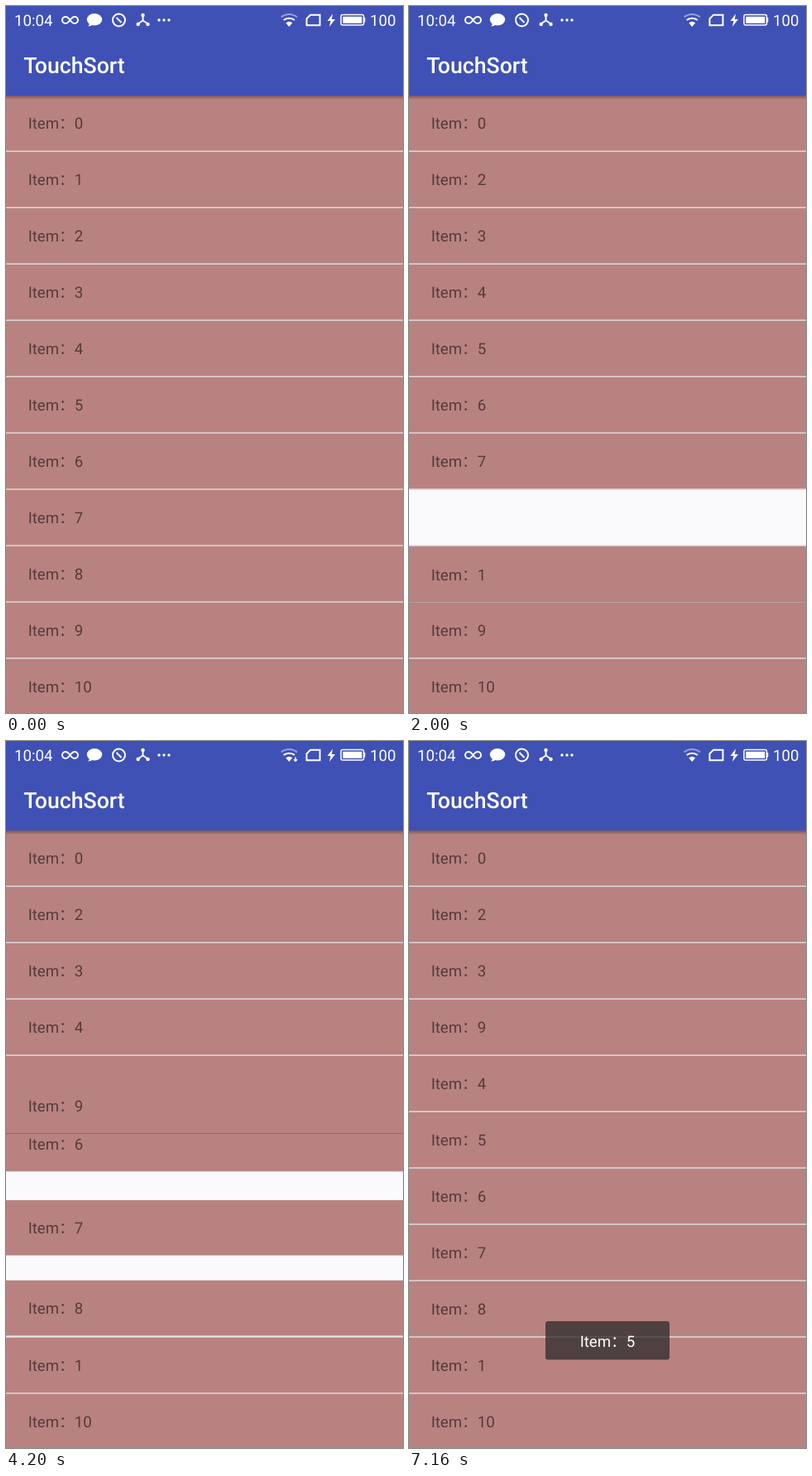
An HTML page that plays this animation: 480 by 853 pixels, repeating every 7.2 s.

```html
<!DOCTYPE html>
<html lang="zh-CN">
<head>
<meta charset="utf-8">
<title>TouchSort</title>
<style>
  html, body { margin: 0; height: 100%; overflow: hidden; background: #faf9fc; }
  svg { display: block; width: 100vw; height: 100vh; }
  text {
    font: 18.67px Roboto, "Noto Sans CJK SC", "Noto Sans CJK", sans-serif;
    text-rendering: geometricPrecision;
  }
  .row text { fill: rgba(0, 0, 0, .54); }
  .icon { fill: none; stroke: #fff; stroke-width: 2; }
  .solid, .bar text { fill: #fff; stroke: none; }
  .bar .title { font-size: 26.67px; font-weight: 500; }
  .dots { stroke-width: 3.4; stroke-linecap: round; stroke-dasharray: 0 6; }
  .nodes { stroke-width: 4.4; stroke-linecap: round; }
</style>
</head>
<body>
<svg viewBox="0 0 480 853">
  <defs>
    <linearGradient id="shade" x2="0" y2="1">
      <stop stop-opacity=".34"/>
      <stop offset="1" stop-opacity="0"/>
    </linearGradient>
  </defs>
  <g id="lines" fill="#ddd"></g>
  <g id="list"></g>
  <rect y="108" width="480" height="5" fill="url(#shade)"/>
  <g class="bar">
    <rect width="480" height="108" fill="#3f51b5"/>
    <text x="10" y="23.5">10:04</text>
    <text x="440" y="23.5">100</text>
    <text class="title" x="21.33" y="81">TouchSort</text>
    <g class="icon">
      <path d="M77.5 17q-3-4-5.500-4a4 4 0 0 0 0 8q2.500 0 5.500-4t5.500-4a4 4 0 0 1 0 8q-2.500 0-5.500-4"/>
      <ellipse class="solid" cx="107" cy="16.300" rx="9.200" ry="7.300"/>
      <path class="solid" d="M101 20q0 3-2 4.500 4 0 6-2z"/>
      <circle cx="136.500" cy="17" r="7.500"/>
      <path d="M133.500 14l6 6M165.500 11v6.500l-6 4M165.500 17.500l6 4"/>
      <path class="nodes" d="M165.500 11h0M159.700 22h0M171.500 22h0"/>
      <path class="dots" d="M185 17h12.100"/>
      <path d="M332.700 13.500a15 15 0 0 1 19.200 0" opacity=".45"/>
      <path d="M335.700 17.100a10.300 10.300 0 0 1 13.200 0"/>
      <path class="solid" d="M342.300 25l-3.900-4.600a6 6 0 0 1 7.800 0z"/>
      <path id="arrow" d="M350 19.500v4.500m-2-1.800l2 2 2-2" stroke-width="1.500"/>
      <path d="M368 10.700h11.500v12.600h-16v-8z"/>
      <path class="solid" d="M395 9.500l-6.500 8.500h4l-1.500 7 7-9h-4.200z"/>
      <rect x="405" y="10.500" width="27.500" height="12.500" rx="2" stroke-width="1.500"/>
      <rect class="solid" x="407.300" y="12.800" width="23" height="8"/>
      <rect class="solid" x="432.500" y="14" width="1.800" height="5.500"/>
    </g>
  </g>
  <g id="toast">
    <rect x="165" y="700" width="150" height="46.500" rx="3" fill="#2b2b2b" fill-opacity=".75"/>
    <text x="206.67" y="730.500" fill="#fff">Item：5</text>
  </g>
</svg>
<script>
const LOOP = 7200, STEP = 40;
const TOP = 107.96, PITCH = 67.97, ROW = 66.64, COUNT = 11;
const SHIFT = 250, RAMP = 160, LAG = 18;
const $ = id => document.getElementById(id);

// The finger travels `reach` px along an S-curve of steepness k around mid
const drags = [
  { from: 1, to: 8, reach: 480, mid: 1426, k: .0085, start: 900, hold: 2030, release: 2030, end: 2280 },
  { from: 9, to: 3, reach: 448, mid: 4074, k: .0067, start: 3620, hold: 4680, release: 4920, end: 5360 },
];
const presses = [
  { item: 1, start: 400, end: 800 },
  { item: 9, start: 3080, end: 3480 },
  { item: 5, start: 6640, end: 6720 },
];

const clamp = x => Math.min(1, Math.max(0, x));
const ease = x => (1 - Math.cos(Math.PI * clamp(x))) / 2;
const during = (span, t) => t >= span.start && t < span.end;

// Each neighbour gives way once the dragged row has passed its slot
const order = [...Array(COUNT).keys()];
for (const d of drags) {
  d.dir = Math.sign(d.to - d.from);
  d.steps = Math.abs(d.to - d.from);
  d.item = order[d.from];
  d.swaps = {};
  for (let n = 1; n <= d.steps; n++) {
    const part = n * PITCH / d.reach;
    d.swaps[order[d.from + n * d.dir]] = d.mid + Math.log(part / (1 - part)) / d.k + LAG;
  }
  order.splice(d.to, 0, ...order.splice(d.from, 1));
}

function dragged(d, t) {
  const curve = 1 / (1 + Math.exp(d.k * (d.mid - Math.min(t, d.hold))));
  const y = d.reach * curve * ease((t - d.start) / RAMP);
  const settle = ease((t - d.release) / (d.end - d.release));
  return d.dir * (y + (d.steps * PITCH - y) * settle);
}

function offset(d, item, t) {
  if (item === d.item) return dragged(d, t);
  return item in d.swaps ? -d.dir * PITCH * ease((t - d.swaps[item]) / SHIFT) : 0;
}

for (const i of order.keys()) {
  $("lines").innerHTML += `<rect y="${TOP + PITCH * i + ROW}" width="480" height="1.33"/>`;
  $("list").innerHTML += `<g class="row"><rect width="480" height="${ROW}"/>
    <rect y="${ROW}" width="480" height="1" fill-opacity=".2"/>
    <text x="26.67" y="40.5">Item：${i}</text></g>`;
}
const rows = [...$("list").children];

function draw(t) {
  rows.forEach((row, i) => {
    const y = drags.reduce((sum, d) => sum + offset(d, i, t), TOP + PITCH * i);
    const held = drags.some(d => d.item === i && during(d, t));
    const pressed = presses.some(p => p.item === i && during(p, t));
    row.setAttribute("transform", `translate(0 ${y.toFixed(2)})`);
    row.children[0].setAttribute("fill", pressed ? "#966665" : "#b88280");
    row.children[1].setAttribute("visibility", held ? "visible" : "hidden");
    if (held && row.nextSibling) $("list").append(row);
  });
  $("arrow").setAttribute("visibility", t >= 3080 && t < 6640 ? "visible" : "hidden");
  $("toast").setAttribute("opacity", clamp((t - 6660) / 500));
}

function frame() {
  const t = performance.now() % LOOP;
  draw(t - t % STEP);
  requestAnimationFrame(frame);
}
frame();
</script>
</body>
</html>
```
